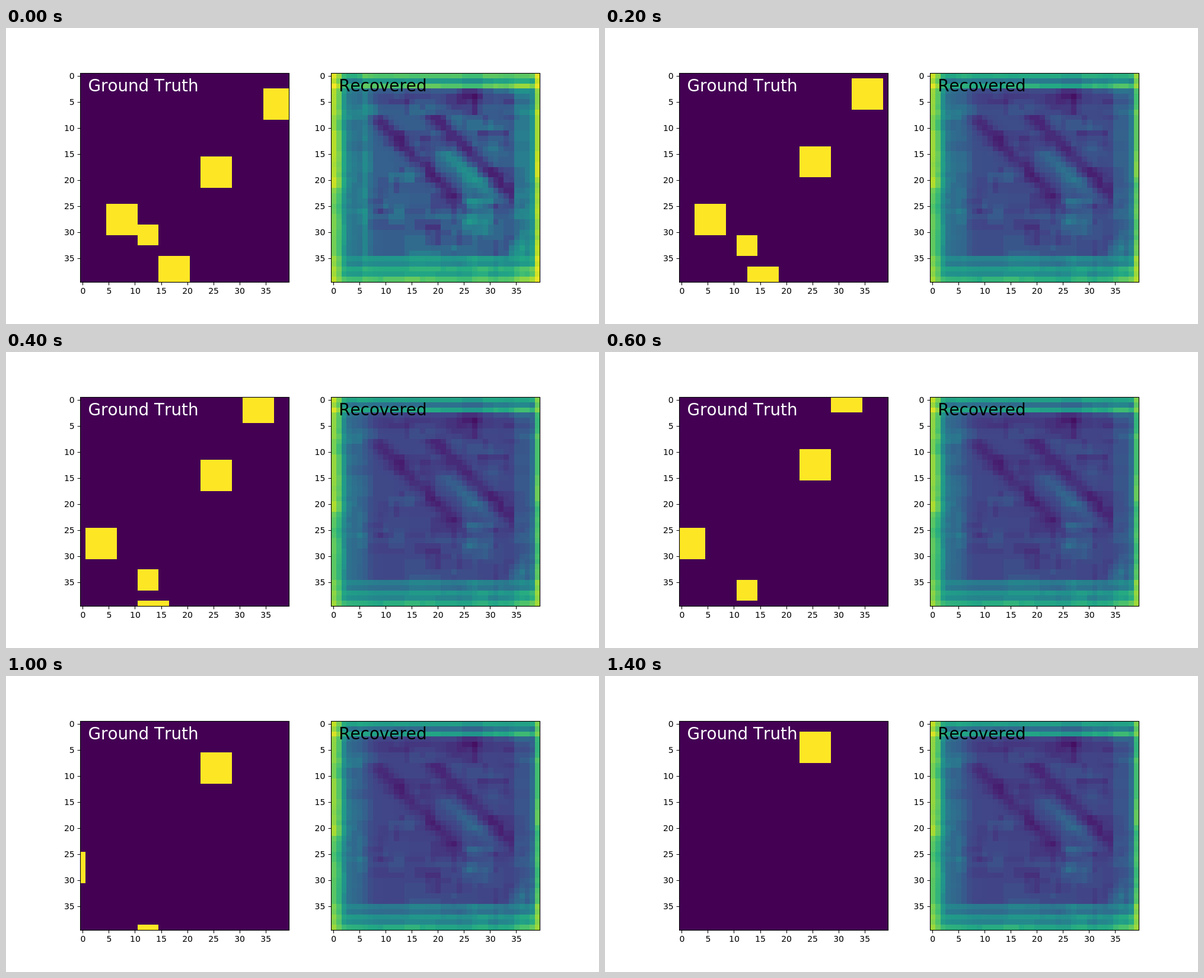
Animation of 1000x500 px, one loop 1500 ms. Source, as an HTML page with a canvas:

```html
<!DOCTYPE html>
<html lang="en">
<head>
<meta charset="utf-8">
<title>Ground Truth and Recovered</title>
<style>
html, body { margin: 0; width: 100%; height: 100%; overflow: hidden; background: #fff; }
canvas { display: block; }
</style>
</head>
<body>
<canvas id="stage" width="1000" height="500"></canvas>
<script>
const ctx = document.getElementById('stage').getContext('2d');
const N = 40, TOP = 76, SIZE = 353, CELL = SIZE / N;
const SPAN = 352.27, TICK = SPAN / N;
const STEP = 100, LOOP = 1500, DECAY = 0.55;

const viridis = ['440154', '482475', '414487', '355f8d', '2a788e', '21918c',
  '22a884', '44bf70', '7ad151', 'bddf26', 'fde725']
  .map(h => [0, 2, 4].map(i => parseInt(h.substr(i, 2), 16)));

function color(v) {
  const p = Math.min(Math.max(v, 0), 1) * 10, i = Math.min(9, Math.floor(p));
  return `rgb(${viridis[i].map((c, k) => Math.round(c + (viridis[i + 1][k] - c) * (p - i)))})`;
}

// Squares: x, y, size, and movement in cells per step
const squares = [
  [35, 3, 6, -1, -1], [23, 16, 6, 0, -1], [5, 25, 6, -1, 0],
  [11, 29, 4, 0, 1], [15, 35, 6, -1, 1]
];

const bump = (d, width) => Math.exp(-((d / width) ** 2));

// Bright left and right borders
function colLevel(x, y) {
  const left = (y > 21 ? .55 : .65) * bump(x, 2.2) + .14 * bump(x - 4.5, 2.5);
  const right = .43 * bump(39 - x, .8) + (x > 34 ? .08 : 0);
  return .18 + left + right;
}

// Striped top and bottom borders
function rowLevel(y) {
  const stripe = Math.cos(Math.PI * y);
  if (y < 3) return .46 + .1 * stripe;
  if (y > 34) return .36 + .045 * (y - 35) - .05 * stripe;
  return .21 - .07 * bump(y - 4.5, 1);
}

// Two dark diagonals with a light one between them
function diagonals(x, y) {
  if (x > 34 || y < 8 || y > 26) return 0;
  const d = x - y;
  return .11 * bump(d - 7, 1.8) * bump(y - 18.5, 4) - .09 * (bump(d, 2) + bump(d - 11.5, 2));
}

const field = Array.from({ length: N }, (_, y) => Array.from({ length: N }, (_, x) => {
  const c = colLevel(x, y), r = rowLevel(y);
  return Math.max(r, c) + .3 * (Math.min(r, c) - .2) + diagonals(x, y);
}));

// Blocky texture
let seed = 7;
const random = () => (seed = seed * 16807 % 2147483647) / 2147483647;
const pick = (a, b) => a + Math.floor(random() * (b - a));
for (let k = 0; k < 220; k++) {
  const x = pick(-3, N), y = pick(-3, N), w = pick(1, 8), h = pick(1, 6);
  const shift = (random() - .5) * .08;
  for (const row of field.slice(Math.max(0, y), Math.max(0, y + h)))
    for (let i = Math.max(0, x); i < Math.min(N, x + w); i++) row[i] += shift;
}

// Extra brightness at the start, which fades as the estimate settles
function gain(v, x, y) {
  const share = x < 6 ? .3 : y > 34 ? .7 : 1;
  return share * Math.min(.17, 1.1 * Math.max(0, v - .12));
}

function fillCells(left, x, y, w, h, fill) {
  const edge = i => Math.ceil(Math.min(Math.max(i, 0), N) * CELL - .5);
  const x0 = edge(x), y0 = edge(y);
  ctx.fillStyle = fill;
  ctx.fillRect(left + x0, TOP + y0, edge(x + w) - x0, edge(y + h) - y0);
}

function text(s, x, y, size, align, fill) {
  ctx.font = `${size}px "DejaVu Sans", sans-serif`;
  ctx.fontKerning = 'none';
  ctx.textAlign = align;
  ctx.fillStyle = fill;
  ctx.fillText(s, x, y);
}

function axes(x0, title, fill) {
  const left = Math.round(x0);
  ctx.strokeStyle = '#000';
  ctx.lineWidth = 1.11;
  ctx.strokeRect(left + .5, TOP + .5, Math.round(x0 + SPAN) - left, SIZE);
  ctx.beginPath();
  for (let n = 0; n < N; n += 5) {
    const x = x0 + (n + .5) * TICK, y = 76.36 + (n + .5) * TICK;
    const tx = Math.round(x) + .5, ty = Math.round(y) + .5;
    ctx.moveTo(tx, 429.5);
    ctx.lineTo(tx, 434.4);
    ctx.moveTo(left + .5, ty);
    ctx.lineTo(left - 4.4, ty);
    text(n, x + .5, 449, 14, 'center', '#000');
    text(n, x0 - 9.3, Math.round(y + 5), 14, 'right', '#000');
  }
  ctx.stroke();
  text(title, x0 + 1.5 * TICK + .3, 107, 27.78, 'left', fill);
}

function draw(step) {
  ctx.fillStyle = '#fff';
  ctx.fillRect(0, 0, 1000, 500);
  fillCells(125, 0, 0, N, N, color(0));
  for (const [x, y, s, dx, dy] of squares)
    fillCells(125, x + dx * step, y + dy * step, s, s, color(1));
  const fade = DECAY ** step;
  field.forEach((row, y) => row.forEach((v, x) =>
    fillCells(548, x, y, 1, 1, color(v + fade * gain(v, x, y)))));
  axes(125, 'Ground Truth', '#fff');
  axes(547.73, 'Recovered', '#000');
}

function tick(now) {
  draw(Math.floor(now % LOOP / STEP));
  requestAnimationFrame(tick);
}
requestAnimationFrame(tick);
</script>
</body>
</html>
```
